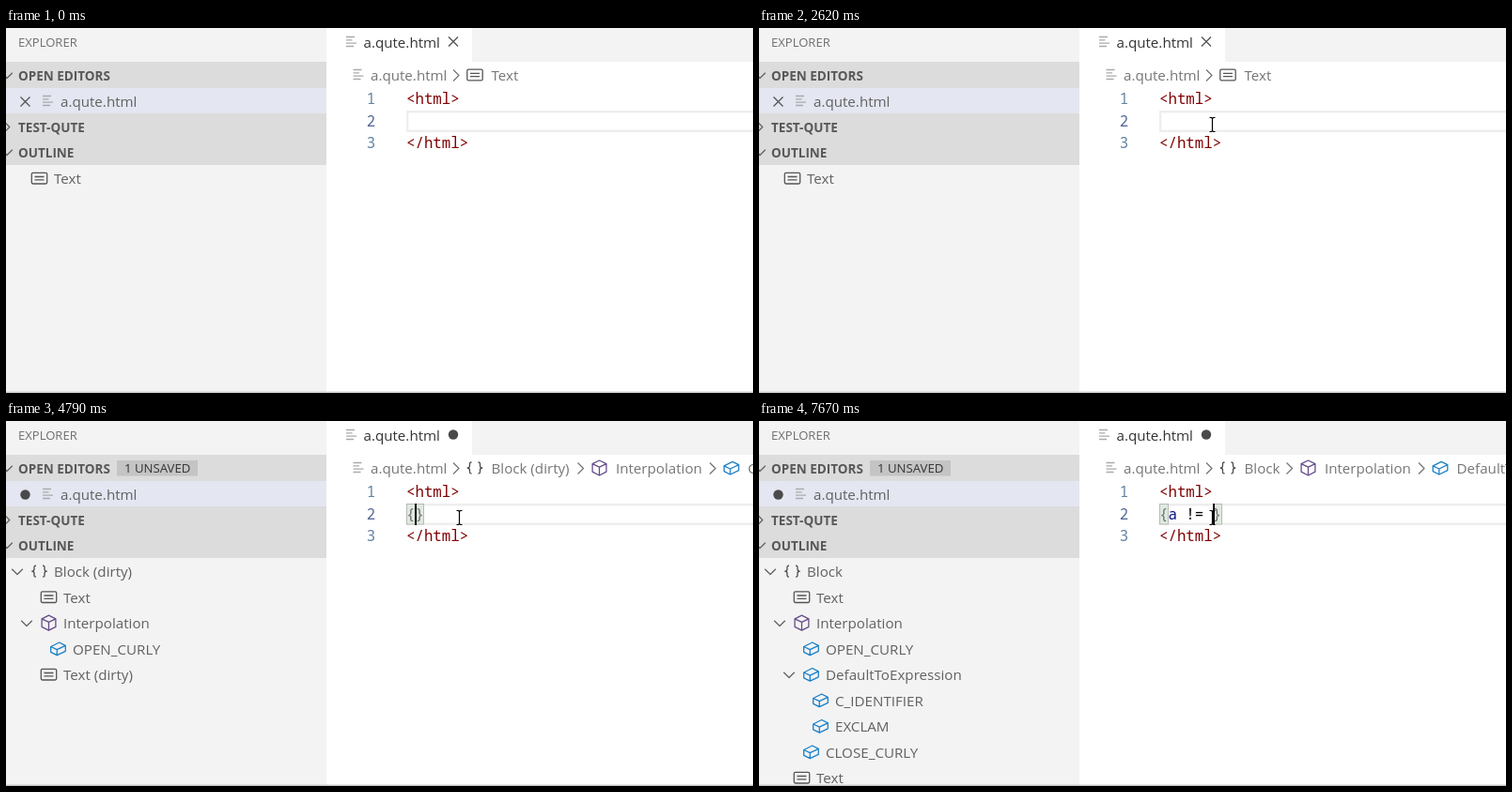
An HTML page for the animation above (8000 ms loop, 795 px wide and 389 px high).

```html
<!DOCTYPE html>
<html lang="en">
<head>
<meta charset="utf-8">
<title>Template editing</title>
<style>
  html, body { margin: 0; width: 100%; height: 100%; overflow: hidden; background: #fff; }
  svg { display: block; width: 795px; height: 389px; }
  text { font: 15.15px "Open Sans", "Noto Sans", sans-serif; fill: #616161; white-space: pre; }
  .title { font-size: 13.05px; fill: #6f6f6f; }
  .head { font-size: 13.5px; font-weight: 700; fill: #585858; }
  .badge { font-size: 13.2px; fill: #333; }
  .tab { fill: #333; }
  .crumb { fill: #767676; }
  .code { font: 15.75px "Noto Sans Mono", "DejaVu Sans Mono", monospace; fill: #800000; }
  .num { fill: #6482a4; }
  .cur { fill: #536a98; }
  .brace { fill: #707070; }
  .var { fill: #001080; }
  .op { fill: #000; }
  .line { fill: none; stroke-width: 1.3; stroke-linejoin: round; }
</style>
</head>
<body>
<svg id="stage" viewBox="0 0 795 389"></svg>
<script>
const LOOP = 8000, COL = 9.45, CODE_X = 426;
const stage = document.getElementById('stage');
const timed = [];

const esc = s => s.replace(/&/g, '&amp;').replace(/</g, '&lt;');
const text = (x, y, s, cls = '') => `<text x="${x}" y="${y}" class="${cls}">${esc(s)}</text>`;
const rect = (x, y, w, h, fill) => `<rect x="${x}" y="${y}" width="${w}" height="${h}" fill="${fill}"/>`;
const path = (d, color) => `<path class="line" d="${d}" stroke="${color}"/>`;
const at = (x, y, s) => `<g transform="translate(${x} ${y})">${s}</g>`;

// Adds markup that is visible from one time up to another.
function show(markup, from = 0, to = LOOP) {
  const g = document.createElementNS('http://www.w3.org/2000/svg', 'g');
  g.innerHTML = markup;
  stage.append(g);
  timed.push({ g, from, to });
  return g;
}

// Icons are drawn around their centre.
const icons = {
  text: `<rect class="line" x="-8.2" y="-5.8" width="16.4" height="11.6" rx="1.4" stroke="#555"/>` +
    path('M-5 -1.7H5M-5 1.7H5', '#555'),
  block: path('M-3.5 -6C-6 -6 -5.5 -4.5 -5.5 -2.5C-5.5 -.8 -6.3 0 -7.8 0C-6.3 0 -5.5 .8 -5.5 2.5C-5.5 4.5 -6 6 -3.5 6' +
    'M3.5 -6C6 -6 5.5 -4.5 5.5 -2.5C5.5 -.8 6.3 0 7.8 0C6.3 0 5.5 .8 5.5 2.5C5.5 4.5 6 6 3.5 6', '#4a4a4a'),
  cube: path('M0 -8L7.4 -4.4V4.2L0 8L-7.4 4.2V-4.4ZM-7.4 -4.4L0 -.8L7.4 -4.4M0 -.8V8', '#664b8a'),
  field: path('M1.2 -6.7L7.8 -3.4V2.6L-1.2 7L-7.8 3.6V-2.2ZM-7.8 -2.2L-1.2 1L7.8 -3.4M-1.2 1V7', '#1a80c8')
};
const fileIcon = (x, y) => at(x, y, path('M0 -5H9M0 -1.7H6.5M0 1.7H11M0 5H8', '#aaa'));
const cross = (x, y) => at(x, y, path('M-5 -5L5 5M5 -5L-5 5', '#555'));
const dot = (x, y) => `<circle cx="${x}" cy="${y}" r="5.2" fill="#4a4a4a"/>`;
const right = (x, y, c = '#767676') => at(x, y, path('M-3 -6L3 0L-3 6', c));
const down = (x, y) => at(x, y, path('M-5.8 -2.8L0 3L5.8 -2.8', '#646465'));

// Fixed workbench
show(
  rect(0, 0, 795, 389, '#fff') + rect(0, 0, 341, 389, '#f3f3f3') + rect(496, 0, 299, 36, '#f3f3f3') +
  rect(0, 36, 341, 110, '#dcdcdc') + rect(0, 64, 341, 27, '#e4e6f1') +
  text(13, 20, 'EXPLORER', 'title') +
  text(13, 56, 'OPEN EDITORS', 'head') + text(13, 110.5, 'TEST-QUTE', 'head') + text(13, 138, 'OUTLINE', 'head') +
  down(1, 50.5) + right(.8, 105.5, '#646465') + down(1, 132.5) +
  fileIcon(39, 77.5) + text(58, 83.7, 'a.qute.html') +
  fileIcon(362, 14.5) + text(380.5, 20.5, 'a.qute.html', 'tab') +
  fileIcon(369.5, 49.5) + text(388, 56, 'a.qute.html', 'crumb') + right(479, 50.5) +
  `<rect x="427.2" y="89.2" width="380" height="20.6" fill="none" stroke="#eee" stroke-width="2.4"/>` +
  [81, 105, 128].map((y, i) => text(383.7, y, `${i + 1}`, i === 1 ? 'code cur' : 'code num')).join('') +
  text(CODE_X, 81, '<html>', 'code') + text(CODE_X, 128, '</html>', 'code')
);

// Saved and unsaved marks
const DIRTY = 2870;
show(cross(20.5, 78.5) + cross(476, 14.5), 0, DIRTY);
show(dot(20.5, 78.5) + dot(476, 14.5) + rect(118, 42, 86, 16.5, '#c4c4c4') + text(126, 55, '1 UNSAVED', 'badge'), DIRTY);

// Outline rows: depth, icon, label, open
const tree = rows => rows.map(([depth, icon, label, open], i) => {
  const x = 10 * depth, y = 161 + 27.5 * i;
  return at(35.5 + x, y - .8, icons[icon]) + text(51 + x, y + 5.3, label) + (open ? down(12 + x, y - .5) : '');
}).join('');

// Breadcrumb parts after the file: x, icon, label
const crumbs = parts => parts.map(([x, icon, label], i) =>
  at(x, 50, icons[icon]) + text(x + 17.5, 56, label, 'crumb') + (i ? right(x - 20, 50.5) : '')).join('');

const OPEN = [2, 'field', 'OPEN_CURLY'], CLOSE = [2, 'field', 'CLOSE_CURLY'];
const inter = [1, 'cube', 'Interpolation', true], leaf = [1, 'text', 'Text'];
const trail = (block, x, last) =>
  crumbs([[499, 'block', block], [x, 'cube', 'Interpolation'], [x + 140.5, 'field', last]]);

show(tree([[0, 'text', 'Text']]) + crumbs([[499, 'text', 'Text']]), 0, 3170);
show(tree([[0, 'block', 'Block (dirty)', true], leaf, inter, OPEN, [1, 'text', 'Text (dirty)']]) +
  trail('Block (dirty)', 631.5, 'OPEN_CURLY'), 3170, 6580);
show(tree([[0, 'block', 'Block', true], leaf, inter, OPEN, [2, 'field', 'C_IDENTIFIER'], CLOSE, leaf]) +
  trail('Block', 584.5, 'C_IDENTIFIER'), 6580, 7280);
show(tree([[0, 'block', 'Block', true], leaf, inter, OPEN, [2, 'field', 'DefaultToExpression', true],
  [3, 'field', 'C_IDENTIFIER'], [3, 'field', 'EXCLAM'], CLOSE, leaf]) +
  trail('Block', 584.5, 'DefaultToExpression'), 7280);
show(rect(0, 387.6, 795, 1.4, '#c4c4c4'));

// Typed line
const typed = [[2770, ''], [6280, 'a'], [6670, 'a '], [6900, 'a !'], [7360, 'a !='], [7670, 'a != ']];
const tint = { '{': 'brace', '}': 'brace', a: 'var', '!': 'op', '=': 'op' };
typed.forEach(([from, body], i) => {
  const chars = [...`{${body}}`];
  const box = n => `<rect x="${Math.round(CODE_X + n * COL) + .5}" y="88.5" width="9" height="21.5" fill="#e0eae0" stroke="#b9b9b9"/>`;
  const glyphs = chars.map((c, n) => c === ' ' ? '' : text(CODE_X + n * COL, 105, c, 'code ' + tint[c]));
  show(box(0) + box(chars.length - 1) + glyphs.join(''), from, typed[i + 1]?.[0]);
});

// Caret: column, on, off
[
  [0, 1150, 1630], [0, 2160, 2620],
  [1, 2770, 3320], [1, 3780, 4260], [1, 4790, 5270], [1, 5730, 6200],
  [2, 6280, 6670], [3, 6670, 6900], [4, 6900, 7360], [5, 7360, 7670], [6, 7670, LOOP]
].forEach(([col, on, off]) => show(rect(Math.round(CODE_X + col * COL), 88, 2, 23, '#000'), on, off));

// Click mark and pointer
show('<circle cx="480" cy="102" r="15" fill="#ffff5c"/>', 1150, 1310).style.mixBlendMode = 'multiply';
const MOVE = { from: 130, to: 910, steps: 10, x0: 681, y0: 382, x1: 482.5, y1: 103 };
const pointer = show('<path d="M-3 -7.5H-1L0 -6.5L1 -7.5H3M0 -6.5V6.5M-3 7.5H-1L0 6.5L1 7.5H3" fill="none" stroke="#000" stroke-width="1.2"/>', MOVE.from);

function draw(t) {
  for (const { g, from, to } of timed) g.style.display = t >= from && t < to ? '' : 'none';
  const u = Math.min(1, Math.max(0, (t - MOVE.from) / (MOVE.to - MOVE.from)));
  const k = 1 - (1 - Math.floor(u * MOVE.steps) / MOVE.steps) ** 2;
  const mix = (a, b) => Math.round((a + (b - a) * k) * 2) / 2;
  pointer.setAttribute('transform', `translate(${mix(MOVE.x0, MOVE.x1)} ${mix(MOVE.y0, MOVE.y1)})`);
}

const start = performance.now();
function tick() {
  draw((performance.now() - start) % LOOP);
  requestAnimationFrame(tick);
}
tick();
</script>
</body>
</html>
```
